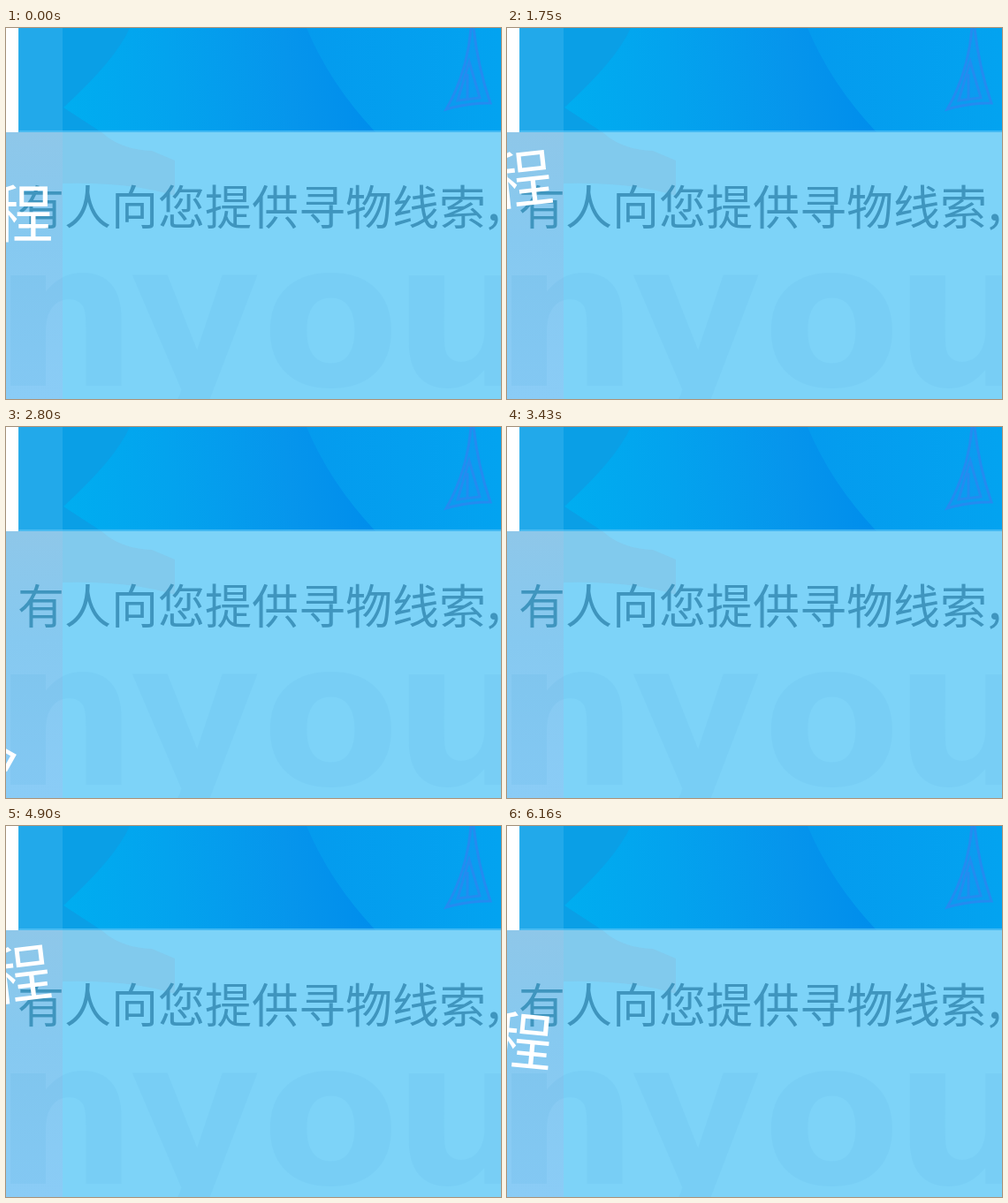
An HTML page that plays this animation: 560 px wide and 420 px high, repeating every 6.23 s.

```html
<!DOCTYPE html>
<html lang="zh">
<head>
<meta charset="utf-8">
<title>流程</title>
<style>
  html, body { margin: 0; width: 100%; height: 100%; overflow: hidden; background: #7dd3f8; }
  svg { display: block; width: 560px; height: 420px; }
  text { font-family: "Noto Sans CJK SC", "Noto Sans CJK", sans-serif; }
  .big { font: 700 228px "DejaVu Sans", sans-serif; fill: #56aee0; opacity: .12; }
  .note { font-size: 53px; fill: #3f95be; }
  .spin { font-size: 71px; fill: #fff; text-anchor: middle; }
</style>
</head>
<body>
<svg viewBox="0 0 560 420">
  <defs>
    <linearGradient id="sky" gradientUnits="userSpaceOnUse" x1="64" y1="40" x2="400" y2="0">
      <stop offset="0" stop-color="#00adf0"/>
      <stop offset=".35" stop-color="#03a3ee"/>
      <stop offset=".75" stop-color="#0695ec"/>
      <stop offset="1" stop-color="#008eec"/>
    </linearGradient>
    <linearGradient id="right" x1="0" x2="1">
      <stop offset="0" stop-color="#049bee"/>
      <stop offset="1" stop-color="#03a3f0"/>
    </linearGradient>
    <linearGradient id="side" x1="0" y1="0" x2="0" y2="1">
      <stop offset="0" stop-color="#8ec7e9"/>
      <stop offset=".4" stop-color="#86c9f0"/>
      <stop offset="1" stop-color="#8accf6"/>
    </linearGradient>
    <filter id="soft"><feGaussianBlur stdDeviation=".7"/></filter>
  </defs>

  <!-- upper banner -->
  <rect width="15" height="118" fill="#fff"/>
  <rect x="14.5" width="545.5" height="118" fill="url(#sky)"/>
  <path d="M340 0Q367 64 418 118H560V0Z" fill="url(#right)"/>
  <path d="M14.5 0H140Q124 36 65 90L108 118H14.5Z" fill="#0a9fe6"/>
  <rect x="14.5" width="49.5" height="118" fill="#22a9ea"/>
  <g stroke="#2f84f0" stroke-width="3" opacity=".75" filter="url(#soft)">
    <path d="M526 0Q522 50 498 92Q522 85 548 85Q534 45 529 0" fill="#2f84f0" fill-opacity=".25"/>
    <path d="M524 38L511 82L536 79ZM522 52V80" fill="none"/>
  </g>

  <!-- lower panel -->
  <rect y="118" width="560" height="302" fill="#7dd3f8"/>
  <path d="M64 118H108Q130 138 165 139L191 150V190Q140 174 64 176Z" fill="#86b8d8" opacity=".35"/>
  <rect y="118" width="64" height="302" fill="url(#side)"/>
  <rect x="14.5" y="116" width="545.5" height="2" fill="#5cc4f6" opacity=".7"/>
  <text class="big" x="-14 140 289 438" y="405">nyou</text>
  <text class="note" x="13" y="222.5" filter="url(#soft)">有人向您提供寻物线索<tspan dx="-4">，</tspan></text>

  <text class="spin" id="spin" x="-337" y="236">失物招领信息发布全流程</text>
</svg>
<script>
  const FRAME = 70, LOOP = 6230, PERIOD = 3164;
  const spin = document.getElementById('spin');

  // CSS "ease", solved by bisection
  function ease(x) {
    const bez = (s, a, b) => 3 * (1 - s) ** 2 * s * a + 3 * (1 - s) * s * s * b + s ** 3;
    let lo = 0, hi = 1;
    for (let i = 0; i < 24; i++) {
      const mid = (lo + hi) / 2;
      if (bez(mid, .25, .25) < x) lo = mid; else hi = mid;
    }
    return bez(lo, .1, 1);
  }

  // One turn clockwise in two thirds of the period, then back in the rest
  function angleAt(time) {
    const p = time % PERIOD / PERIOD * 3;
    return 360 * (p < 2 ? ease(p / 2) : 1 - ease(p - 2));
  }

  const start = performance.now();
  function draw() {
    const time = Math.max(0, performance.now() - start) % LOOP;
    const angle = angleAt(Math.floor(time / FRAME) * FRAME);
    spin.setAttribute('transform', `rotate(${angle.toFixed(2)} -337 208)`);
    requestAnimationFrame(draw);
  }
  draw();
</script>
</body>
</html>
```
